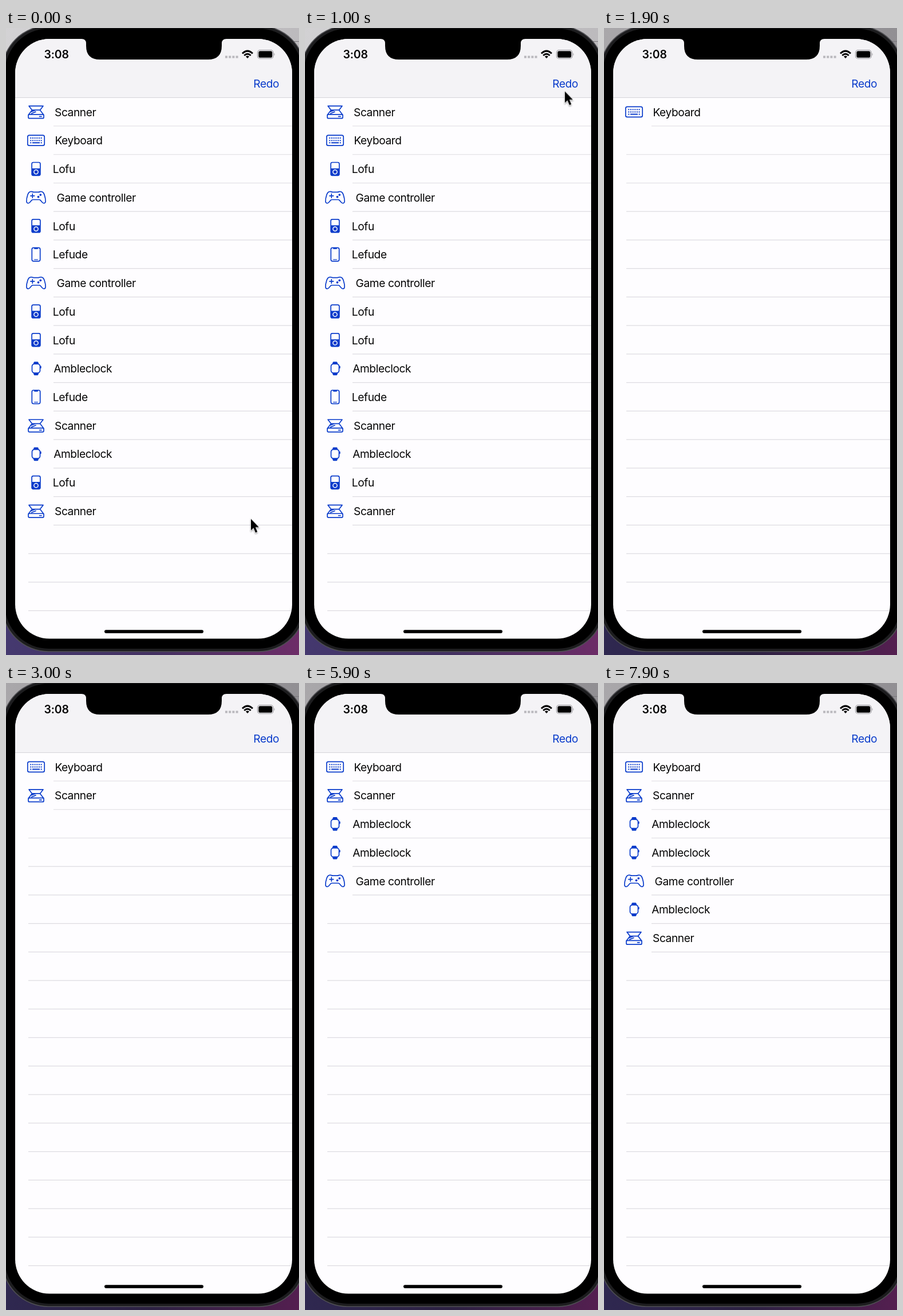
These frames come from a looping animation (512x1094 px, 8 s). An HTML page:

```html
<!DOCTYPE html>
<html lang="en">
<head>
<meta charset="utf-8">
<title>Device list</title>
<style>
  html, body { margin: 0; width: 100%; height: 100%; overflow: hidden; background: #000; }
  svg { display: block; }
  text { font-family: Inter, Roboto, sans-serif; font-size: 19.2px; letter-spacing: -.43px; fill: #050505; }
  .icon { fill: none; stroke: #0a3ccb; stroke-width: 1.7; stroke-linejoin: round; stroke-linecap: round; }
  .icon .solid { fill: #0a3ccb; stroke: none; }
  .line { stroke: #dddce1; stroke-width: 1.2; }
</style>
</head>
<body>
<svg id="stage" width="512" height="1094" viewBox="0 0 512 1094">
  <defs>
    <linearGradient id="dayTop"><stop stop-color="#d3d2d4"/><stop offset="1" stop-color="#bcbabd"/></linearGradient>
    <linearGradient id="duskTop"><stop stop-color="#a9a7aa"/><stop offset="1" stop-color="#918f93"/></linearGradient>
    <linearGradient id="dayLow"><stop stop-color="#45396f"/><stop offset=".5" stop-color="#433162"/><stop offset="1" stop-color="#6d2d68"/></linearGradient>
    <linearGradient id="duskLow"><stop stop-color="#2f2850"/><stop offset=".5" stop-color="#2c2142"/><stop offset="1" stop-color="#541f50"/></linearGradient>
    <clipPath id="glass"><rect x="16" y="19" width="484" height="1046.500" rx="60"/></clipPath>
    <filter id="shade" x="-50%" y="-50%" width="200%" height="200%">
      <feDropShadow dx="0" dy="1.500" stdDeviation="1.300" flood-opacity=".4"/>
    </filter>

    <g id="scanner" class="icon">
      <path d="M-12.500-10.300H12.500L7-3.200H-7ZM-7-3.200L-13.300 5M7-3.200L13.300 5M-8-.500L-1.500-3M-8 2.800L-.500-.300"/>
      <rect x="-13.500" y="4.500" width="27" height="6.800" rx="2"/>
      <path d="M6 8H9.500"/>
    </g>
    <g id="keyboard" class="icon">
      <rect x="-14.700" y="-9" width="29.400" height="18" rx="3"/>
      <path stroke-width="2" stroke-linecap="butt" stroke-dasharray="2 1.650"
        d="M-10.200-4.200H10.500M-10.200 0H10.500"/>
      <path stroke-width="2" stroke-linecap="butt" d="M-10.200 4.200h2M-6.500 4.200H6.500M8.200 4.200h2"/>
    </g>
    <g id="player" class="icon">
      <rect x="-7.400" y="-11.400" width="14.800" height="22.800" rx="2.600"/>
      <path class="solid" d="M-7.500-1H7.500V9Q7.500 11.500 5 11.500H-5Q-7.500 11.500-7.500 9Z"/>
      <circle cy="5.200" r="3.600" stroke="#fefdff" stroke-width="1.500"/>
    </g>
    <g id="pad" class="icon">
      <path d="M-8.500-10.300C-12-10.300-13.500-8-14.600-4.500C-16-.300-16.800 4-16.600 7.300C-16.400 10.500-13 11-10.900 8.600L-7.500 4.700Q-6.700 3.900-5.500 3.900H5.500Q6.700 3.900 7.500 4.700L10.900 8.600C13 11 16.400 10.500 16.600 7.300C16.800 4 16 -.300 14.600-4.500C13.500-8 12-10.300 8.500-10.300C6.500-10.300 6-9.200 4-9.200H-4C-6-9.200-6.500-10.300-8.500-10.300Z"/>
      <path d="M-9.600-2.800H-2.800M-6.200-6.200V.600"/>
      <circle class="solid" cx="7.800" cy="-4.500" r="1.900"/>
      <circle class="solid" cx="4" cy="-.900" r="1.900"/>
    </g>
    <g id="phone" class="icon">
      <rect x="-7.200" y="-11.800" width="14.400" height="23.600" rx="2.800"/>
      <path class="solid" d="M-4-11.800H4L3-9.300H-3Z"/>
      <path stroke-width="1.300" d="M-2.900 9H2.900"/>
    </g>
    <g id="watch" class="icon">
      <rect x="-7" y="-7.800" width="14" height="15.600" rx="4"/>
      <path class="solid" d="M-5-7.500L-3.800-11Q-3.500-11.900-2.500-11.900H2.500Q3.500-11.900 3.800-11L5-7.500ZM-5 7.500L-3.800 11Q-3.500 11.900-2.500 11.900H2.500Q3.500 11.900 3.800 11L5 7.500Z"/>
      <path d="M8.300-3.600V-1"/>
    </g>
  </defs>

  <rect width="512" height="547" fill="url(#duskTop)"/>
  <rect y="547" width="512" height="547" fill="url(#duskLow)"/>
  <g id="day">
    <rect width="512" height="547" fill="url(#dayTop)"/>
    <rect y="547" width="512" height="547" fill="url(#dayLow)"/>
  </g>
  <path d="M498 23.500H512" stroke="#78767a"/>

  <rect x="-7" y="-4" width="530" height="1092" rx="81" fill="#1d1d1f" stroke="#505054" stroke-width="1.500"/>
  <rect x="-2" y="1" width="520" height="1082" rx="77"/>
  <g clip-path="url(#glass)">
    <rect x="16" y="19" width="484" height="1047" fill="#fefdff"/>
    <rect x="16" y="19" width="484" height="102" fill="#f4f3f6"/>
    <path d="M16 121.500H500" stroke="#d5d4d9" stroke-width="1.200"/>
    <g id="list"></g>
  </g>
  <path d="M132 18V19Q140 19 140 27V31Q140 55 164 55H353Q377 55 377 31V27Q377 19 385 19V18Z"/>

  <text x="66.500" y="53" style="font-weight:600;font-size:19.500px;letter-spacing:-.2px">3:08</text>
  <path d="M383 50.500H406" stroke="#b9b8bd" stroke-width="4" stroke-dasharray="4 2.200"/>
  <g fill="none" stroke="#000" stroke-width="2.900">
    <path d="M413 44.500Q422 35.800 431 44.500M416.300 48Q422 42.600 427.700 48"/>
    <path d="M419 49.700Q422 47.200 425 49.700L422 53Z" fill="#000" stroke="none"/>
  </g>
  <rect x="439.500" y="38.500" width="27.500" height="15" rx="4.500" fill="none" stroke="#98979c" stroke-width="1.200"/>
  <rect x="441.300" y="40.300" width="24" height="11.400" rx="2.800"/>
  <path d="M468.500 43.500Q470.500 46 468.500 48.500Z" fill="#98979c"/>
  <text x="432.300" y="103.700" style="fill:#0a3ccb">Redo</text>
  <rect x="172" y="1050.300" width="173" height="5.600" rx="2.800"/>

  <g id="cursor">
    <path d="M0 0V20L4.500 15.800L8 24L11.300 22.600L7.900 14.500H14Z" stroke="#fff" stroke-width="1.500"
      paint-order="stroke" filter="url(#shade)"/>
  </g>
</svg>
<script>
const LOOP = 8000, RESET = 1900, ROW = 49.74, SLOTS = 18;
const NS = "http://www.w3.org/2000/svg";
const list = document.getElementById("list");

// symbol id: [label, text x]
const KINDS = {
  scanner: ["Scanner", 85],
  keyboard: ["Keyboard", 85.4],
  player: ["Lofu", 81.8],
  pad: ["Game controller", 88.6],
  phone: ["Lefude", 81.8],
  watch: ["Ambleclock", 83.2]
};
const before = ("scanner keyboard player pad player phone pad player player " +
  "watch phone scanner watch player scanner").split(" ");
const after = [
  ["keyboard", 1900], ["scanner", 2900], ["watch", 3900], ["watch", 5000],
  ["pad", 5900], ["watch", 6900], ["scanner", 7900]
];

function add(parent, tag, attrs, text) {
  const el = document.createElementNS(NS, tag);
  for (const key in attrs) el.setAttribute(key, attrs[key]);
  if (text) el.textContent = text;
  return parent.appendChild(el);
}

function play(el, frames) {
  el.animate(frames, { duration: LOOP, iterations: Infinity });
}

// Visible from one time to another, with hard switches.
function show(el, from, to) {
  const marks = [[0, from ? 0 : 1]];
  if (from) marks.push([from, 1]);
  if (to < LOOP) marks.push([to, 0]);
  marks.push([LOOP, to < LOOP ? 0 : 1]);
  play(el, marks.map(([t, opacity]) => ({ offset: t / LOOP, opacity, easing: "step-end" })));
}

function addRow(kind, i, from, to) {
  const [label, x] = KINDS[kind];
  const g = add(list, "g", { transform: `translate(0 ${146.4 + i * ROW})` });
  add(g, "use", { href: "#" + kind, x: 52.5, y: 0 });
  add(g, "text", { x, y: 7.2 }, label);
  show(g, from, to);
}

before.forEach((kind, i) => addRow(kind, i, 0, RESET));
after.forEach(([kind, t], i) => addRow(kind, i, t, LOOP));

// Empty slots have a longer separator, so its left part comes and goes.
for (let i = 0; i < SLOTS; i++) {
  const y = 171 + i * ROW;
  add(list, "path", { class: "line", d: `M83 ${y}H500` });
  const stub = add(list, "path", { class: "line", d: `M39 ${y}H83` });
  if (i < before.length) show(stub, RESET, i < after.length ? after[i][1] : LOOP);
}
// The first slot is refilled at the reset itself.
list.querySelectorAll("path")[1].remove();

const path = [
  [0, 428, 857], [100, 426, 810], [200, 421, 590], [300, 419, 350],
  [400, 423, 215], [500, 431, 143], [600, 448, 87], [900, 448, 87],
  [1000, 454, 110], [1200, 478, 220], [1400, 525, 380], [LOOP, 525, 380]
];
play(document.getElementById("cursor"), path.map(([t, x, y]) => ({
  offset: t / LOOP, transform: `translate(${x}px, ${y}px)`
})));

play(document.getElementById("day"), [
  { offset: 0, opacity: 1 }, { offset: 1000 / LOOP, opacity: 1 },
  { offset: 1800 / LOOP, opacity: 0 }, { offset: 1, opacity: 0 }
]);
</script>
</body>
</html>
```
